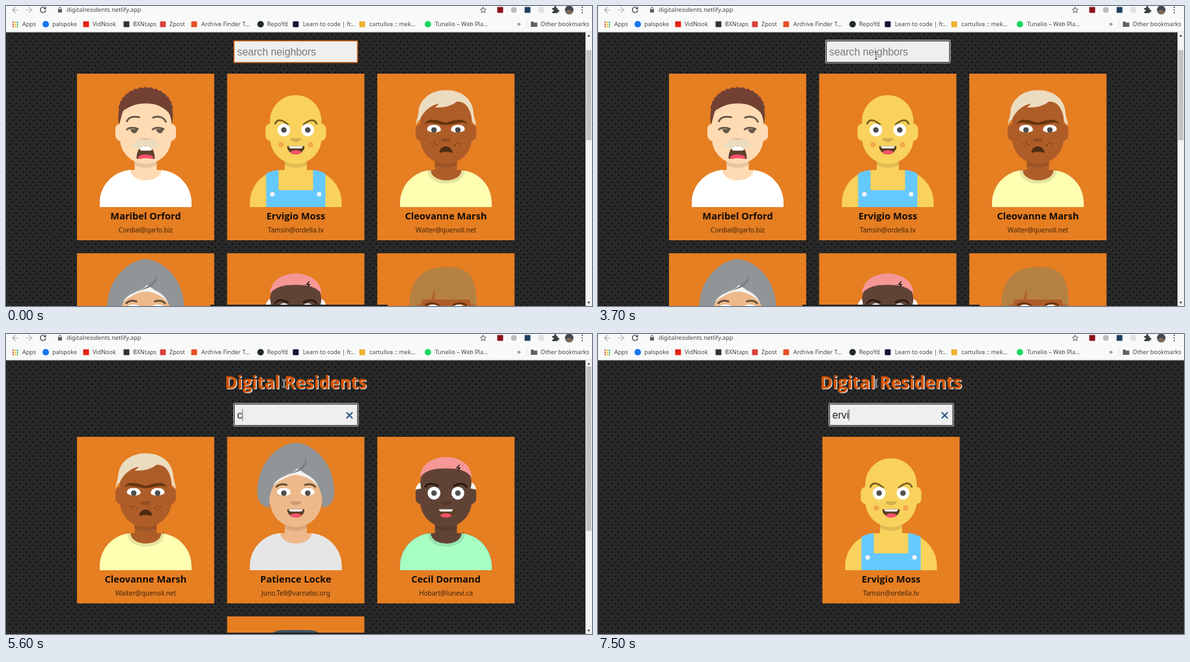
Write an HTML page that moves like this. It is 900x461 px and loops after 8 s.

```html
<!DOCTYPE html>
<html lang="en">
<head>
<meta charset="utf-8">
<title>Neighbor search</title>
<style>
  html, body { margin: 0; width: 100%; height: 100%; overflow: hidden; background: #282828; }
  svg { display: block; width: 900px; height: 461px; }
  .ui { font: 9px "Noto Sans", sans-serif; fill: #444749; }
  .title { font: 700 26px "Open Sans", sans-serif; text-anchor: middle; }
  .name { font: 700 14.6px "Open Sans", sans-serif; text-anchor: middle; fill: #120c06; }
  .mail { font: 10px "Noto Sans", sans-serif; text-anchor: middle; fill: #3d230c; }
  .field { font: 15.8px "Liberation Sans", Arial, sans-serif; }
</style>
</head>
<body>
<svg viewBox="0 0 900 461" xmlns="http://www.w3.org/2000/svg">
  <defs id="defs"></defs>
  <g id="page"></g>
  <g id="chrome"></g>
  <g id="pointer"></g>
</svg>
<script>
const $ = id => document.getElementById(id);
const path = (d, fill, extra = '') => `<path d="${d}" fill="${fill}" ${extra}/>`;
const line = (d, color, w, extra = '') =>
  `<path d="${d}" fill="none" stroke="${color}" stroke-width="${w}" stroke-linecap="round" ${extra}/>`;
const dot = (x, y, r, fill) => `<circle cx="${x}" cy="${y}" r="${r}" fill="${fill}"/>`;
const box = (x, y, w, h, fill, extra = '') =>
  `<rect x="${x}" y="${y}" width="${w}" height="${h}" fill="${fill}" ${extra}/>`;
const text = (x, y, s, cls, extra = '') => `<text x="${x}" y="${y}" class="${cls}" ${extra}>${s}</text>`;
const group = (transform, s) => `<g transform="${transform}">${s}</g>`;
const both = s => s + group('matrix(-1 0 0 1 200 0)', s);

// ---- avatars, drawn in a 200 x 244 body space ----
const SHADE = 'rgba(0,0,0,.6)', NAVY = '#3e5463', CREAM = '#ecdcbf';
const BODY = 'M124 144.6V163H128C167.8 163 200 195.2 200 235V244H0V235C0 195.2 32.2 163 72 163H76V144.6' +
  'C58.8 136.4 46.4 119.7 44.3 99.9C38.5 99 34 94 34 88V74C34 68 38.3 63 44 62.2V56C44 25 69 0 100 0' +
  'S156 25 156 56V62.2C161.7 63 166 68 166 74V88C166 94 161.5 99 155.7 99.9C153.6 119.7 141.2 136.4 124 144.6Z';
const SHIRT = 'M134 163.3C171 166.3 200 197.3 200 235V244H0V235C0 197 29.6 165.8 67 163.2' +
  'C66.5 176.2 82 185.8 100.5 185.8S134.5 176.2 134 163.3Z';
const SMILE = 'M81 113C82.2 122 90.2 129 100 129S118 122 119 113Q119 111 117 111H83Q81 111 81 113Z';
const SCREAM = 'M80 137C81 123 84.7 111 100 111S119 123 120 137Q120 139 118 139C105 137 95 137 82 139Q80 139 80 137Z';

const body = skin => path(BODY, skin) +
  path('M156 79V102A56 56 0 0 1 44 102V94A56 56 0 0 0 156 94Z', 'rgba(0,0,0,.1)', 'clip-path="url(#bodyClip)"');
const nose = path('M88 94C88 98.4 93.4 102 100 102S112 98.4 112 94Z', 'rgba(0,0,0,.16)');
const shirt = color => path(SHIRT, color);
const collar = line('M63.5 164C63 180 82 189.5 100.5 189.5S138 180 137.5 164', 'rgba(0,0,0,.1)', 7, 'stroke-linecap="butt"');
const stare = both(dot(74, 76, 14, '#fff') + dot(74, 76, 6, '#4d4d4d'));
const squint = both(path('M59 76C59 66 67 65 74 65S89 67 89 77C83 83 65 83 59 76Z', '#fff') + dot(74, 76, 6, '#4d4d4d'));
const grin = path(SMILE, '#5a4024') +
  `<g clip-path="url(#smileClip)">${box(85, 100, 30, 16, '#fff', 'rx="5"')}` +
  `<ellipse cx="100" cy="128" rx="14" ry="8" fill="#ff4f6d"/></g>`;
const frown = path('M86 126C86 107 114 107 114 126Q100 121 86 126Z', '#4f2b12');

function curls() {
  const n = 15;
  let d = 'M42 64C39 50 41 40 42 30';
  for (let i = 0; i <= n; i++) {
    const a = Math.PI * (1.02 + .96 * i / n);
    d += `A7 7 0 0 1 ${(100 + 58 * Math.cos(a)).toFixed(1)} ${(32 + 47 * Math.sin(a)).toFixed(1)}`;
  }
  return d + 'C160 42 159 54 157 64C156 52 154 46 150 38C132 20 116 18 98 18C78 18 62 26 51 34C47 44 46 54 42 64Z';
}

const sideEye = line('M59 75C64 70 77 70 83 74', SHADE, 4) + path('M66 74H82C83 84 72 86 68 78Z', SHADE);
const avatars = {
  curly: body('#ffdbb4') + shirt('#fff') + nose +
    path(SCREAM, '#5f3f2c') + `<g clip-path="url(#screamClip)">${box(87, 104, 27, 17, '#fff', 'rx="5"')}` +
    `<ellipse cx="100" cy="138" rx="17" ry="9" fill="#ff4f6d"/></g>` +
    both(path('M100 98C92 93 79 96 75 104Q71 108 67 107C71 117 90 116 100 110Z', CREAM)) +
    sideEye + group('translate(56 0)', sideEye) +
    line('M59 57C63 47 75 46 86 48', SHADE, 4) + line('M116 49C128 44 139 48 144 58', SHADE, 4) +
    path(curls(), '#724133'),

  bald: body('#f8d25c') + path('M35.5 171Q48 164 62.4 163V207H137.6V163Q152 164 164.5 171V244H35.5Z', '#65c9ff') +
    both(dot(49, 216, 5, '#f4f4f4') + line('M55 62C60 51 70 53 83 64', '#7c5f1f', 4) + dot(68, 108, 6, '#f5a94b')) +
    stare + nose + grin,

  waved: body('#ae5d29') + shirt('#ffffb1') + collar + squint + nose +
    both(path('M53 63C62 46 86 56 100 60V65C84 65 66 55 53 63Z', '#66350f') +
      dot(68, 106, 1.5, '#74390f') + dot(75, 104, 1.5, '#74390f') + dot(80, 109, 1.5, '#74390f') + dot(71, 111, 1.2, '#74390f')) +
    frown +
    path('M35 67C34 56 39 50 40 38C42 8 68 -11 100 -11C134 -11 158 8 160 38C161 50 166 56 165 67L157 57' +
      'C156 42 152 32 146 24Q138 14 124 14Q108 28 76 27Q82 23 85 18C66 22 50 36 43 54Q37 57 35 67Z', CREAM),

  hat: path('M100 146C68 146 48 154 46 172H154C152 154 132 146 100 146Z', NAVY) +
    body('#d08b5b') + shirt(NAVY) +
    both(path('M76 148C58 151 48 158 46 172C58 188 80 202 100 202V194C82 194 68 182 68 166C68 158 72 152 76 148Z', '#34495a')) +
    box(63, 191, 7, 53, '#f4f4f4') + box(129, 191, 7, 44, '#f4f4f4', 'rx="3"') +
    both(dot(74, 76, 6, '#6f4628') + line('M58 64Q62 56 74 54', '#7c4a26', 4)) + nose +
    path('M53 98C56 112 72 98 84 97Q100 104 116 97C128 98 144 112 147 98C151 130 147 160 131 174' +
      'Q100 188 69 174C53 160 49 130 53 98Z', CREAM) +
    path('M77 122C78 112 90 110 100 113C110 110 122 112 123 122C122 133 110 134 100 129C90 134 78 133 77 122Z', '#d08b5b') +
    line('M88 114Q100 124 112 114', '#6f4628', 5) +
    path('M69 81C73 88 76 92 75 96A6.5 6.5 0 0 1 62 96C62 92 66 88 69 81Z', '#92d9ff') +
    path('M30 30C30 0 46 -17 72 -17H128C154 -17 170 0 170 30V138Q170 147 160 147Q149 146 149 134V44H51V134Q51 146 40 147Q30 147 30 138Z', NAVY) +
    both(line('M51.5 44V132', '#f4f4f4', 4)) + box(40, 14, 119, 36, '#f4f4f4', 'rx="9"'),

  turban: body('#edb98a') + shirt('#e6e6e6') + squint + nose + grin +
    both(line('M58 62Q66 54 80 58', SHADE, 4)) +
    path('M100 -34C128 -34 184 0 184 75C184 95 172 106 157 108C160 70 150 46 100 28C50 46 40 70 43 108' +
      'C28 106 16 95 16 75C16 0 72 -34 100 -34Z', '#929598') +
    path('M73 40C88 34 96 30 103 22L121 34Q140 42 150 62Q130 38 100 36Q75 38 50 60Q58 46 73 40Z', '#f4f4f4') +
    path('M120 -6C126 10 112 24 84 35C104 31 120 24 124 10Z', '#7b7f82'),

  pink: body('#614335') + shirt('#a7ffc4') + collar + stare + nose + grin +
    both(line('M55 62C60 54 70 54 83 60', SHADE, 4) + path('M34 68Q35 58 44 52L46 66Z', '#f4f4f4')) +
    path('M44 42C44 14 70 -3 100 -3S156 14 156 42C146 26 126 22 100 22S54 26 44 42Z', '#f59797') +
    line('M129 15L124 21H130L126 27', '#3b251d', 2.5),

  fringe: path('M100 -17C150 -17 164 4 166 50C170 96 180 120 186 170H14C20 120 24 100 20 66C22 20 40 -17 100 -17Z', '#b58143') +
    body('#ae5d29') + shirt('#e6e6e6') + collar + squint + nose + grin +
    both(line('M56 66Q68 58 84 66', '#66350f', 4)) +
    path('M42 70C38 20 60 -10 100 -10S160 20 158 70L150 54H76L75 31L68 54H50Z', '#b58143')
};

const users = [
  ['Maribel Orford', 'Cordial@qarlo.biz', 'curly'],
  ['Ervigio Moss', 'Tamsin@ordella.tv', 'bald'],
  ['Cleovanne Marsh', 'Walter@quenoli.net', 'waved'],
  ['Patience Locke', 'Juno.Tell@varnabo.org', 'turban'],
  ['Cecil Dormand', 'Hobart@lunevi.ca', 'pink'],
  ['Roberta Winslow', 'Osk_Vane@parlune.info', 'fringe'],
  ['Otto Brandhurst', 'Tiv.Marn@dolwen.io', 'bald'],
  ['Melvin Tarrow', 'Sol@ferrano.me', 'curly'],
  ['Noelle Purdham', 'Ansel@brintova.io', 'fringe'],
  ['Cleovanna DiMarco', 'Lou.Hartwen@selino.biz', 'hat']
];

// The page is laid out in CSS pixels and shown at this zoom.
const ZOOM = .6588;
const holes = [[8, 8], [0, 0], [16, 0], [0, 16], [16, 16]];
const clip = (id, d) => `<clipPath id="${id}"><path d="${d}"/></clipPath>`;
$('defs').innerHTML = clip('bodyClip', BODY) + clip('smileClip', SMILE) + clip('screamClip', SCREAM) +
  `<pattern id="carbon" width="16" height="16" patternUnits="userSpaceOnUse" patternTransform="translate(0 40.4) scale(${ZOOM})">` +
  box(0, 0, 16, 16, '#282828') +
  holes.map(([x, y]) => dot(x, y + 1, 2, 'rgba(255,255,255,.1)')).join('') +
  holes.map(([x, y]) => dot(x, y, 1.75, '#000')).join('') + '</pattern>' +
  Object.entries(avatars).map(([id, art]) => `<g id="${id}">${art}</g>`).join('');

// ---- browser bars ----
const bookmarks = [
  [61, 71, 'palspoke', '#1877f2', 1], [123, 133, 'VidNook', '#e62117'], [185, 195, 'BXNtaps', '#333'],
  [241, 251, 'Zpost', '#d9453a'], [289, 300, 'Archive Finder T...', '#e8502a'], [391, 401, 'RepoYd', '#24292e', 1],
  [445, 456, 'Learn to code | fr...', '#14142b'], [547, 558, 'cartuliva :: mek...', '#eeb12f'],
  [648, 659, 'Tunelio – Web Pla...', '#1ed760', 1]
];
const mark = (x, y, color, round) => round ? dot(x, y, 5, color) : box(x - 4.5, y - 4.5, 9, 9, color, 'rx="1"');

function bars() {
  let s = box(0, 0, 900, 40, '#f8f9f9') + box(0, 39.5, 900, 1, '#d5d7d8');
  s += line('M18.5 6H10M14 2L10 6L14 10', '#a3a6a9', 1.2) + line('M31 6H39.5M35.5 2L39.5 6L35.5 10', '#b5b8ba', 1.2);
  s += line('M60.2 3.2A4.2 4.2 0 1 0 61 7', '#46494c', 1.4) + path('M61.5 .8V5H57.3Z', '#46494c');
  s += box(80, 5, 6, 5, '#55585b', 'rx=".8"') + line('M81.3 5V3.5A1.7 1.7 0 0 1 84.7 3.5V5', '#55585b', 1);
  s += text(93, 9, 'digitalresidents.netlify.app', 'ui', 'style="font-size:9.2px"');
  s += line('M733 1.8L734.3 4.7L737.4 5L735 7.1L735.7 10.2L733 8.5L730.3 10.2L731 7.1L728.6 5L731.7 4.7Z', '#55585b', 1);
  s += mark(759, 6, '#8a1014') + dot(780, 6, 4.5, '#b9bbbd') + mark(801, 6, '#1d4060') + dot(822, 6, 5, '#dfe1e3');
  s += path('M839 3H842A1.8 1.8 0 1 1 845 3H847V6A1.8 1.8 0 1 1 847 9V11H839V8.5A1.6 1.6 0 1 0 839 5.5Z', '#3c4043');
  s += dot(865, 6, 6.5, '#40464f') + path('M859 9Q865 3 871 9A6.5 6.5 0 0 1 859 9Z', '#7a6a5c');
  s += [2, 6, 10].map(y => dot(885, y, 1.1, '#46494c')).join('');
  const hues = ['#ea4335', '#fbbc04', '#34a853', '#4285f4'];
  for (let i = 0; i < 9; i++) s += box(10 + i % 3 * 3.3, 24 + (i / 3 | 0) * 3.3, 2, 2, hues[(i + (i / 3 | 0)) % 4]);
  s += text(25, 31, 'Apps', 'ui');
  for (const [x, tx, label, color, round] of bookmarks) s += mark(x, 28, color, round) + text(tx, 31, label, 'ui');
  s += text(785, 31, '»', 'ui', 'style="font-size:11px"') + box(799, 22, 1, 12, '#dcdee0');
  s += path('M806 24H810L811 25.5H816V32H806Z', '#5f6368') + text(821, 31, 'Other bookmarks', 'ui');
  return s;
}
$('chrome').innerHTML = bars() + box(314, 459, 272, 2, '#1e1e1e');

// ---- page ----
const ruler = document.createElement('canvas').getContext('2d');
ruler.font = '15.8px "Liberation Sans", Arial, sans-serif';
const CARD = 320 * ZOOM, PITCH = 350 * ZOOM;

function card([name, mail, art], x, y, turn) {
  return group(`translate(${x} ${y})`, box(0, 0, CARD, 256, '#e67e22') +
    group(`rotate(${turn} 105.5 113)`, `<use href="#${art}" transform="translate(35 33) scale(.705)"/>`) +
    text(105.5, 223.5, name, 'name') + text(105.5, 244, mail, 'mail'));
}

function field(mid, s) {
  const x = mid - 95.5, tx = mid - 90;
  let out = s.focus
    ? box(x, 106.6, 191.6, 35, '#efefef', 'rx="2" stroke="#dfe1e2" stroke-width="1"') +
      box(x + 1, 107.6, 189.6, 33, 'none', 'rx="1.5" stroke="#15191c" stroke-width="1.2"')
    : box(x + .7, 107.7, 189.6, 33, '#efefef', 'stroke="#dc6a1c" stroke-width="1.5"');
  out += s.q ? text(tx, 130, s.q, 'field', 'fill="#222"') : text(tx, 130, 'search neighbors', 'field', 'fill="#7a7a7a"');
  if (s.q) out += group(`translate(${mid + 82.5} 125)`, line('M-4 -4L4 4M4 -4L-4 4', '#31598c', 2.2));
  if (s.caret) out += box(tx + ruler.measureText(s.q).width, 115.5, ZOOM, 18, '#222');
  return out;
}

function scrollbar(height, top) {
  const k = 402 / height;
  return box(890, 40, 10, 421, '#f3f3f3') + box(891, 50 + top * k, 8, 421 * k, '#c2c2c2') +
    path('M892.5 47L895 44L897.5 47Z', '#505050') + path('M892.5 454.5L895 457.5L897.5 454.5Z', '#505050');
}

function drawPage(s) {
  const found = users.filter(u => u[0].toLowerCase().includes(s.q));
  const height = 118 + Math.ceil(found.length / 3) * 276;
  const scrolls = height > 421, mid = scrolls ? 445 : 450;
  let out = box(0, 0, 900, 600, 'url(#carbon)');
  out += text(mid + 1.3, 85.3, 'Digital Residents', 'title', 'fill="#e9ecec"') +
    text(mid, 84, 'Digital Residents', 'title', 'fill="#d35400"') + field(mid, s);
  found.slice(0, 6).forEach((u, i) => {
    const row = i / 3 | 0, n = Math.min(3, found.length - row * 3);
    const x = mid - CARD / 2 + (i % 3 - (n - 1) / 2) * PITCH;
    out += card(u, x, 158 + row * 276, u === users[0] ? s.a : u === users[1] ? s.b : 0);
  });
  return group(`translate(0 ${-s.top})`, out) + (scrolls ? scrollbar(height, s.top) : '');
}

function drawPointer({ at, beam }) {
  if (!at) return '';
  const beamPath = 'M-2 -5.5H2M0 -5.5V5.5M-2 5.5H2';
  return group(`translate(${at})`, beam
    ? line(beamPath, '#eee', 2.2) + line(beamPath, '#333', .9)
    : path('M0 0V11.5L2.7 9L4.6 13.2L6.6 12.2L4.7 8.2H8.2Z', '#3f4448', 'stroke="#e8e8e8" stroke-width=".8"'));
}

// ---- timeline: each step overrides part of the state ----
const steps = [
  [0, { q: '', top: 54, focus: 0, caret: 0, at: null, beam: 0, a: 0, b: 0 }],
  [500, { at: [50, -4] }], [600, { at: [60, 8] }], [700, { at: [84, 26] }],
  [800, { at: [114, 49] }], [900, { at: [140, 71] }], [1000, { at: [155, 84] }],
  [1200, { at: [178, 118] }], [1300, { at: [198, 152], a: 3 }],
  [1400, { at: [210, 177], a: 7 }], [1500, { at: [214, 185], a: 10 }],
  [1800, { at: [250, 230] }], [1900, { at: [300, 290], a: 8 }], [2000, { at: [345, 311], a: 4 }],
  [2100, { at: [390, 270], a: 1, b: 3 }], [2200, { at: [425, 210], a: 0, b: 7 }],
  [2300, { at: [432, 130], b: 6 }], [2400, { at: [427, 88], b: 2.4 }],
  [3700, { at: [427, 76], beam: 1, focus: 1, b: 0 }],
  [4100, { q: 'c', caret: 1 }], [4200, { q: 'cl', top: 0 }], [4400, { q: 'cle' }], [4600, { q: 'clee' }],
  [5000, { q: 'cle' }], [5100, { caret: 0 }], [5400, { q: 'cl' }],
  [5600, { q: 'c', caret: 1 }], [5700, { q: '' }], [6300, { caret: 0 }],
  [6600, { q: 'e', caret: 1 }], [6900, { q: 'er' }], [7300, { q: 'erv' }], [7500, { q: 'ervi' }]
];
const LOOP = 8000, start = performance.now();
let shown = -1;

function tick() {
  const t = (performance.now() - start) % LOOP;
  const now = steps.filter(([at]) => at <= t);
  if (now.length !== shown) {
    shown = now.length;
    const state = Object.assign({}, ...now.map(step => step[1]));
    $('page').innerHTML = drawPage(state);
    $('pointer').innerHTML = drawPointer(state);
  }
  requestAnimationFrame(tick);
}
tick();
</script>
</body>
</html>
```
